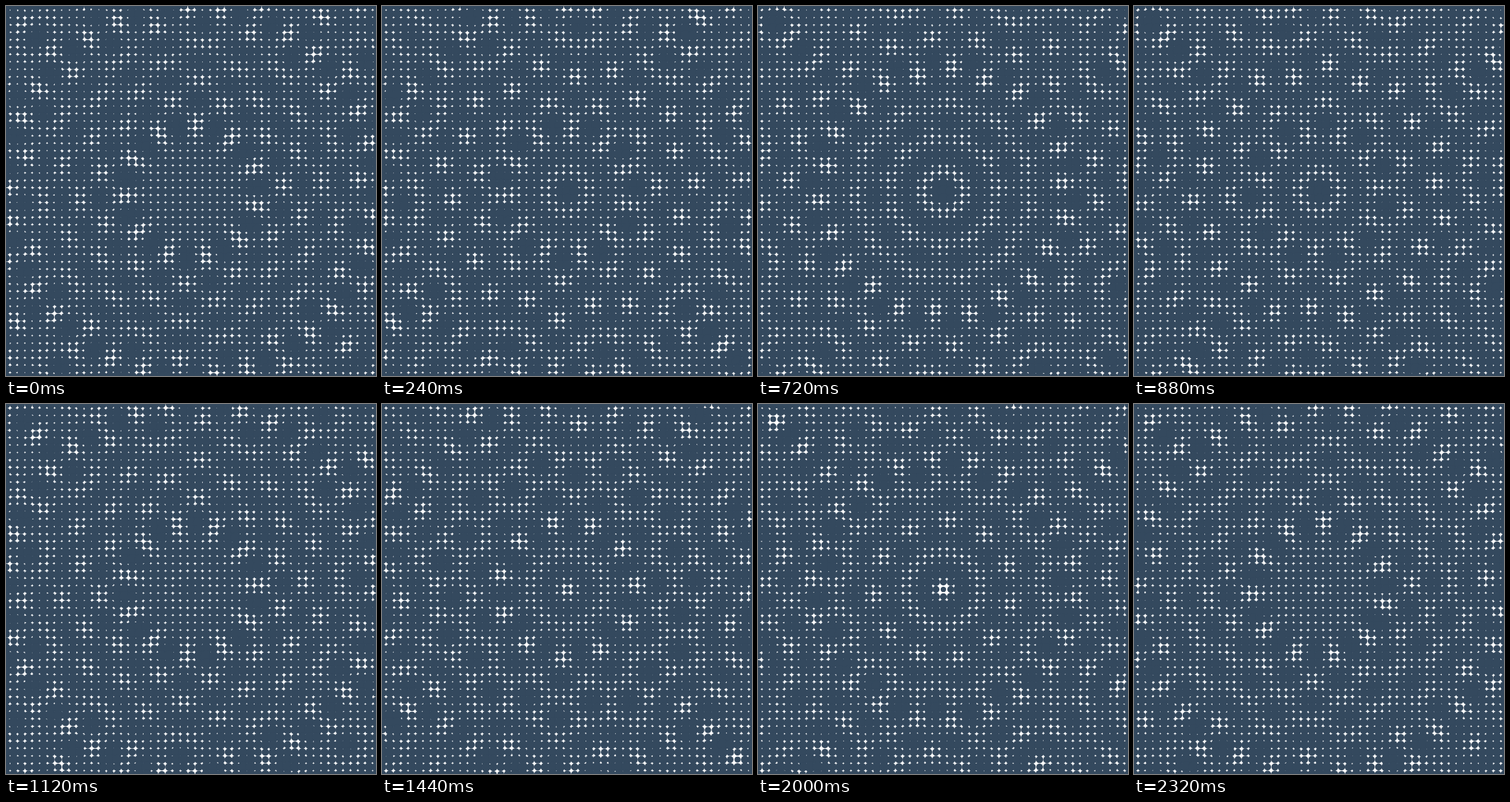
Animation, 500 px wide and 500 px high, one loop 2400 ms. Source, as an HTML page with a canvas:

```html
<!DOCTYPE html>
<html lang="en">
<head>
<meta charset="utf-8">
<title>Eleven waves</title>
<style>
  html, body { margin: 0; width: 100%; height: 100%; overflow: hidden; background: #34495e; }
  canvas { display: block; width: 500px; height: 500px; }
</style>
</head>
<body>
<canvas id="stage" width="500" height="500"></canvas>
<script>
const ctx = document.getElementById('stage').getContext('2d');
const SIZE = 500, PITCH = 10, WAVES = 11;
const STEPS = 30, STEP_MS = 80;
const BASE = 6, GAIN = 0.25;   // disc radius = BASE - GAIN * wave sum
const SHIFT = 0.5;             // discs are centred on whole pixels
const TAU = 2 * Math.PI;

// Plane waves of equal length, fanned out evenly from the diagonal
const waves = Array.from({ length: WAVES }, (_, i) => {
  const a = Math.PI / 4 + TAU * i / WAVES;
  return [Math.SQRT2 * Math.cos(a), Math.SQRT2 * Math.sin(a)];
});

// The sum of cos(u + phase) splits into a fixed even and odd part per disc
const discs = [];
for (let y = 0; y <= SIZE; y += PITCH) {
  for (let x = 0; x <= SIZE; x += PITCH) {
    const gx = (x - SIZE / 2) / PITCH, gy = (y - SIZE / 2) / PITCH;
    let even = 0, odd = 0;
    for (const [kx, ky] of waves) {
      const u = kx * gx + ky * gy;
      even += Math.cos(u);
      odd += Math.sin(u);
    }
    discs.push({ x: x + SHIFT, y: y + SHIFT, even, odd });
  }
}

function draw(step) {
  const phase = Math.PI / 2 + TAU * step / STEPS;
  const c = Math.cos(phase), s = Math.sin(phase);
  ctx.fillStyle = '#fff';
  ctx.fillRect(0, 0, SIZE, SIZE);
  ctx.fillStyle = '#34495e';
  for (const d of discs) {
    const r = BASE - GAIN * (d.even * c - d.odd * s);
    ctx.beginPath();
    ctx.arc(d.x, d.y, Math.max(r, 0), 0, TAU);
    ctx.fill();
  }
}

const start = performance.now();
let shown = 0;
draw(shown);

function tick() {
  const step = Math.floor((performance.now() - start) / STEP_MS) % STEPS;
  if (step !== shown) draw(shown = step);
  requestAnimationFrame(tick);
}
requestAnimationFrame(tick);
</script>
</body>
</html>
```
